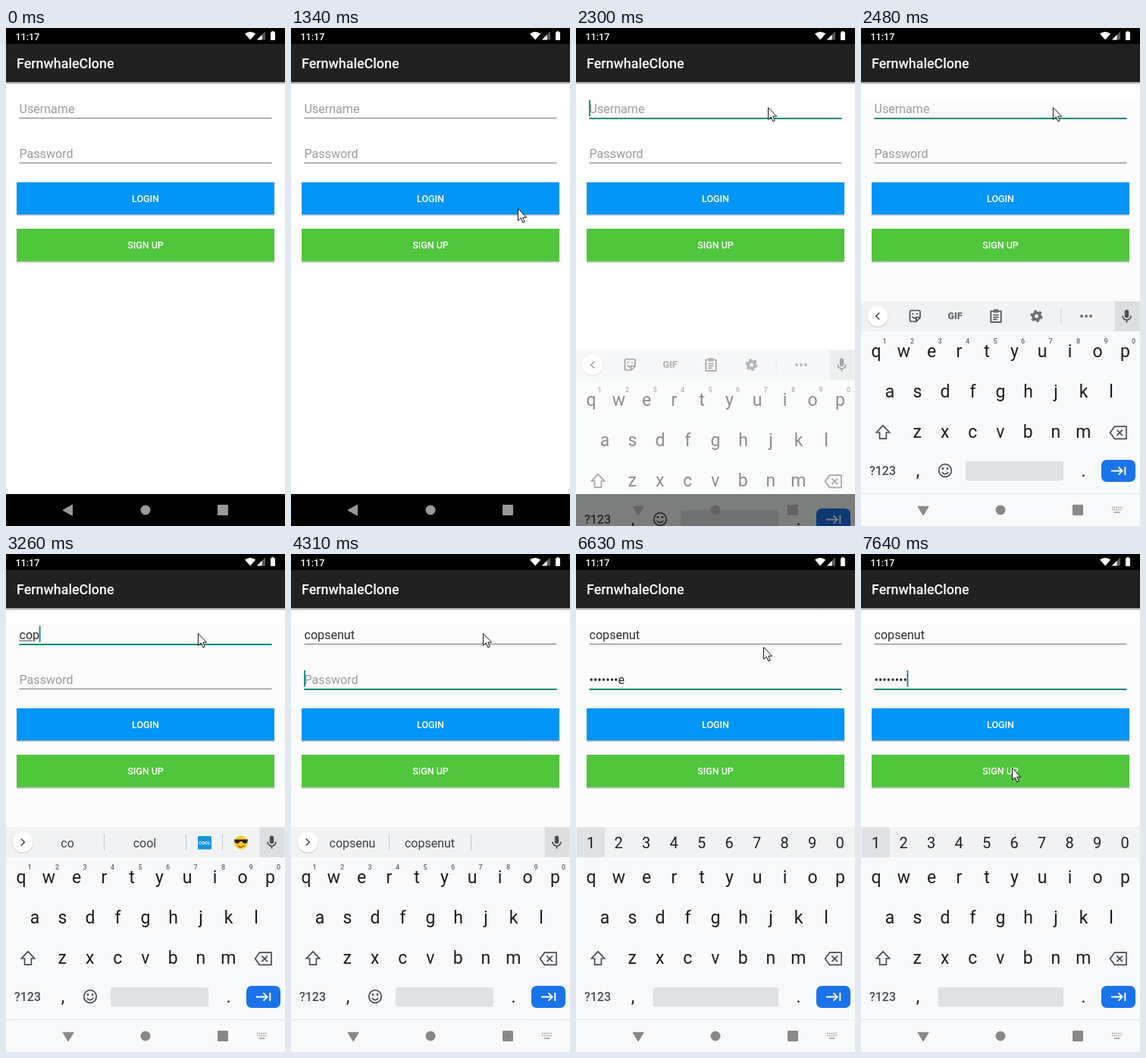
An HTML page that plays this animation: 368x655 px, repeating every 8000 ms.

```html
<!DOCTYPE html>
<html lang="en">
<head>
<meta charset="utf-8">
<title>Login screen</title>
<style>
  html, body { margin: 0; width: 100%; height: 100%; overflow: hidden; background: #fefefe; }
  svg { display: block; width: 368px; height: 655px; font-family: Roboto, "Noto Sans", sans-serif; }
  text { white-space: pre; }
  .mid { text-anchor: middle; }
  .btn { font-size: 12.5px; font-weight: 500; fill: #fff; text-anchor: middle; }
  .field { font-size: 16.1px; fill: #2b2b2b; }
  .hint { fill: #9b9b9b; }
  .key { font-size: 23px; fill: #1b1c1e; text-anchor: middle; }
  .sup { font-size: 9px; font-weight: 500; fill: #5f6368; text-anchor: middle; }
  .digit { font-size: 20px; fill: #202124; text-anchor: middle; }
  .sugg { font-size: 16px; fill: #3c4043; text-anchor: middle; }
  .line { fill: none; stroke: #4a4d51; stroke-width: 1.7; }
  .tool { fill: #6a6d70; }
</style>
</head>
<body>
<svg viewBox="0 0 368 655">
  <defs>
    <linearGradient id="shade" x1="0" y1="0" x2="0" y2="1">
      <stop offset="0" stop-color="#000" stop-opacity=".45"/>
      <stop offset="1" stop-color="#000" stop-opacity="0"/>
    </linearGradient>
  </defs>

  <rect width="368" height="655" fill="#fefefe"/>
  <rect id="tint" y="94" width="368" height="519" fill="#fcfcfd"/>

  <!-- app bar and status bar -->
  <rect y="71" width="368" height="3.5" fill="url(#shade)"/>
  <rect width="368" height="71" fill="#212121"/>
  <rect width="368" height="21" fill="#000"/>
  <text x="12.5" y="15.5" font-size="12.5" font-weight="500" fill="#fff">11:17</text>
  <g fill="#fff">
    <path d="M315 7.4Q322 2.4 329.3 7.4L322.2 15.6Z"/>
    <path d="M342 4.6V15.6H331Z" opacity=".35"/>
    <path d="M337.6 9V15.6H331Z"/>
    <path d="M349 5.5H350.4V4.2H353.4V5.5H355V16H349Z"/>
  </g>
  <text x="14" y="53" font-size="17.9" font-weight="500" fill="#fff">FernwhaleClone</text>

  <!-- form -->
  <rect id="userLine" x="17.5" y="118" width="333" height="1" fill="#777"/>
  <rect id="userFocus" x="17.5" y="118" width="333" height="2" fill="#0b8578"/>
  <rect id="passLine" x="17.5" y="177" width="333" height="1" fill="#777"/>
  <rect id="passFocus" x="17.5" y="177" width="333" height="2" fill="#0b8578"/>
  <text id="userHint" class="field hint" x="17.5" y="112">Username</text>
  <text id="passHint" class="field hint" x="17.5" y="170.5">Password</text>
  <text id="user" class="field" x="17.5" y="112"></text>
  <text id="pass" class="field" x="17.5" y="170.5"></text>
  <rect id="compose" x="17.5" y="113.6" height="1" fill="#444"/>
  <rect id="caret" width="1.8" height="21.5" fill="#0b8578"/>

  <g fill="#000">
    <rect x="14" y="204" width="340" height="43.2" opacity=".12"/>
    <rect x="14" y="204" width="340" height="42.2" opacity=".2"/>
    <rect x="14" y="265" width="340" height="43.7" opacity=".12"/>
    <rect x="14" y="265" width="340" height="42.7" opacity=".2"/>
  </g>
  <rect x="14" y="203" width="340" height="42.2" fill="#0095f6"/>
  <rect x="14" y="264" width="340" height="42.7" fill="#4fc63b"/>
  <text class="btn" x="184" y="229">LOGIN</text>
  <text class="btn" x="184" y="290">SIGN UP</text>

  <rect y="613" width="368" height="42" fill="#000"/>

  <!-- keyboard -->
  <g id="board">
    <rect y="359" width="368" height="296" fill="#f8f9fa"/>
    <rect y="359" width="368" height="40" fill="#f0f2f3"/>
    <rect y="612" width="368" height="1" fill="#e3e5e7"/>
    <g id="keys"></g>
    <path class="line" d="M29 522.8L37.6 532H33.4V540.2H24.6V532H20.4Z"/>
    <path class="line" d="M334.5 524.2H350V540.3H334.5L328.6 532.2ZM337.4 528.6L345 536.2M345 528.6L337.4 536.2"/>
    <text class="mid" x="28.5" y="588" font-size="16" font-weight="500" fill="#4a4d51">?123</text>
    <text class="key" x="75" y="590">,</text>
    <text class="key" x="293.5" y="590">.</text>
    <rect x="317" y="568" width="45" height="29" rx="7" fill="#1a73e8"/>
    <path d="M330 582.5H344.5M339.5 577.3L344.7 582.5L339.5 587.7M348.3 577V588" fill="none" stroke="#fff" stroke-width="1.9"/>

    <g id="plain">
      <g id="sups"></g>
      <rect x="138" y="570" width="129" height="25.5" rx="3" fill="#dfe1e3"/>
      <circle class="line" cx="111" cy="582" r="8.3"/>
      <g fill="#4a4d51"><circle cx="108" cy="579.5" r="1.4"/><circle cx="114" cy="579.5" r="1.4"/></g>
      <path class="line" d="M106.8 584Q111 589.4 115.2 584"/>
      <rect x="334.5" y="359.5" width="33" height="39.5" fill="#dcdee0"/>
      <rect x="347.8" y="370.5" width="5.4" height="10.6" rx="2.7" fill="#4a4d51"/>
      <path class="line" d="M345 378.5A5.5 5.5 0 0 0 356 378.5M350.5 384V387.6"/>
      <circle cx="22" cy="380" r="14" fill="#000" opacity=".12"/>
      <circle cx="22" cy="379" r="13.5" fill="#fff"/>
      <path id="chevron" class="line"/>

      <g id="tools" class="tool">
        <path class="line" d="M64.5 373.5Q64.5 371.5 66.5 371.5H76Q78 371.5 78 373.5V381L73 386H66.5Q64.5 386 64.5 384ZM78 380.5H72.8V386M67.5 379.5Q69.5 382.5 72.5 381"/>
        <circle cx="68.5" cy="376" r="1.2"/><circle cx="74" cy="376" r="1.2"/>
        <text class="mid" x="124" y="383.2" font-size="12.5" font-weight="900">GIF</text>
        <path class="line" d="M171.3 372.5H184.7V386.8H171.3ZM174.3 377.5H181.7M174.3 380.5H181.7M174.3 383.4H179.5"/>
        <rect x="174.5" y="370" width="7" height="4.6" rx="1"/>
        <circle cx="231.5" cy="379" r="4.4" fill="none" stroke="#6a6d70" stroke-width="3.8"/>
        <circle cx="231.5" cy="379" r="6.8" fill="none" stroke="#6a6d70" stroke-width="2.6" stroke-dasharray="3.56"/>
        <rect x="263.5" y="368.5" width="1" height="21" fill="#cfd2d4"/>
        <circle cx="291" cy="379" r="1.9"/><circle cx="297" cy="379" r="1.9"/><circle cx="303" cy="379" r="1.9"/>
      </g>

      <g id="words">
        <path d="M129.5 368.5V390M237.5 368.5V390" stroke="#c3c6c9"/>
        <text class="sugg" x="81" y="385.5"></text>
        <text class="sugg" x="183" y="385.5"></text>
        <text class="sugg" x="286" y="385.5"></text>
        <g id="emoji">
          <path d="M285.5 368.5V390" stroke="#c3c6c9"/>
          <rect x="253" y="371" width="18" height="17.5" rx="1.5" fill="#1594dc"/>
          <text class="mid" x="262" y="382" font-size="6" font-weight="700" fill="#fff">COOL</text>
          <circle cx="310" cy="379.5" r="9" fill="#fcc62d"/>
          <path d="M300.8 375.5H319.2L318 379.6Q314 383 311.2 378H308.8Q306 383 302 379.6Z" fill="#222"/>
          <path d="M306 384.3Q310 387 314.3 383.6" fill="none" stroke="#6b4310" stroke-width="1.2"/>
        </g>
      </g>
    </g>

    <g id="secret">
      <rect x="1" y="359.5" width="37" height="39.5" fill="#dfe1e3"/>
      <g id="digits"></g>
      <rect x="101.5" y="570" width="165.5" height="25.5" rx="3" fill="#dfe1e3"/>
    </g>
  </g>

  <!-- navigation -->
  <g id="nav">
    <path id="back" stroke-width="1" stroke-linejoin="round"/>
    <circle cx="184" cy="634" r="6.5"/>
    <rect x="279" y="627" width="14" height="14" rx="1.3"/>
  </g>
  <g id="picker" fill="none" stroke="#999" stroke-width="1.5">
    <path d="M331 630.5H344M331 633.5H344" stroke-dasharray="1.6 1.2"/>
    <path d="M333.5 637H341.5"/>
  </g>

  <path id="mouse" d="M.5 .7V16.4L4.2 13L6.9 19L9.3 17.9L6.7 12.2H11.6Z" fill="#fff" stroke="#111" stroke-width="1"/>
</svg>
<script>
const LOOP = 8000, LEFT = 17.5, PITCH = 36.5;
const $ = id => document.getElementById(id);
const show = (id, on) => { $(id).style.display = on ? "" : "none"; };
const set = (id, attrs) => { for (const k in attrs) $(id).setAttribute(k, attrs[k]); };
const count = (times, t) => times.filter(x => x <= t).length;

function row(id, chars, cls, x, y) {
  $(id).innerHTML += [...chars].map((c, i) =>
    `<text class="${cls}" x="${x + i * PITCH}" y="${y}">${c}</text>`).join("");
}
row("keys", "qwertyuiop", "key", 20, 433.3);
row("keys", "asdfghjkl", "key", 38, 486);
row("keys", "zxcvbnm", "key", 74.3, 538.7);
row("sups", "1234567890", "sup", 31, 415.3);
row("digits", "1234567890", "digit", 19.5, 387);

const USER = "copsenut", PASS = "honeyate";
const userTimes = [2900, 3080, 3260, 3530, 3710, 3800, 3980, 4080];
const passTimes = [4640, 4730, 5010, 5160, 5340, 5430, 5580, 5670];
const wordTimes = [2990, 3170, 3530, 3710, 3800, 3980, 4080];
const wordSets = [
  ["c", "can", "come"], ["co", "cool", ""], ["cop", "copy", "cops"],
  ["cops", "copse", "copses"], ["copse", "copses", "corpse"],
  ["copsen", "copse", "copses"], ["copsenu", "copsenut", ""]
];
const wordEls = document.querySelectorAll(".sugg");

// keyboard entrance: opacity and drop
const riseTimes = [2230, 2300, 2380, 2480];
const rise = [[.25, 96], [.5, 64], [.86, 18], [1, 0]];

function mouseAt(t) {
  if (t < 1520) {
    const p = Math.min(9, Math.floor((t - 650) / 86.25)) / 8;
    return [362 - 63 * p ** 3.92, 640 - 403 * p ** 1.88];
  }
  const p = Math.max(0, Math.min(10, Math.floor((t - 6540) / 82) + 1)) / 10;
  const e = p * p * (3 - 2 * p);
  return [253 - 54 * e, 104 + 177 * e];
}

function caretOn(t) {
  if (t < 4310) return t >= 1980 && (t < 2480 || t >= 2900);
  return !(t >= 6170 && t < 6670) && !(t >= 7170 && t < 7640);
}

function draw(t) {
  const inPass = t >= 4310, secret = t >= 4400;

  // fields
  const n = count(userTimes, t), m = count(passTimes, t);
  const masked = t >= 7170 ? m : m - 1;
  const user = $("user"), pass = $("pass");
  user.textContent = USER.slice(0, n);
  pass.textContent = m ? "•".repeat(masked) + PASS.slice(masked, m) : "";
  show("userHint", !n);
  show("passHint", !m);
  set("userFocus", { opacity: inPass ? 0 : [0, .35, .7, 1][count([1800, 1890, 1980], t)] });
  show("passFocus", inPass);
  show("compose", n > 1 && !inPass);
  if (n > 1) set("compose", { width: user.getSubStringLength(0, n - 1) });

  const active = inPass ? pass : user;
  const len = active.textContent ? active.getComputedTextLength() : 0;
  show("caret", caretOn(t));
  set("caret", { x: LEFT - .4 + len, y: inPass ? 153 : 94.5 });

  // keyboard
  const step = count(riseTimes, t);
  show("board", step);
  show("tint", step > 3);
  if (step) {
    const [alpha, drop] = rise[step - 1];
    set("board", { opacity: alpha, transform: `translate(0 ${drop})` });
  }
  const w = count(wordTimes, t);
  show("plain", !secret);
  show("secret", secret);
  show("tools", !w);
  show("words", w);
  show("emoji", w === 2);
  set("chevron", { d: w ? "M19.8 374.5L24.3 379L19.8 383.5" : "M24.3 374.5L19.8 379L24.3 383.5" });
  wordEls.forEach((el, i) => { el.textContent = w ? wordSets[w - 1][i] : ""; });

  // navigation
  const tone = ["#999", "#808080", "#636363", "#7c7c7c", "#888"][step];
  set("nav", { fill: tone, stroke: "none" });
  set("back", {
    stroke: tone,
    d: step ? "M75 629.3H89.2L82.1 641Z" : "M75 634.2L87.5 627.2V641.2Z"
  });
  show("picker", step > 3);

  // pointer
  show("mouse", t >= 650);
  if (t >= 650) set("mouse", { transform: `translate(${mouseAt(t).map(v => Math.round(v)).join(" ")})` });
}

const start = performance.now();
function tick() {
  draw((performance.now() - start) % LOOP);
  requestAnimationFrame(tick);
}
tick();
</script>
</body>
</html>
```
